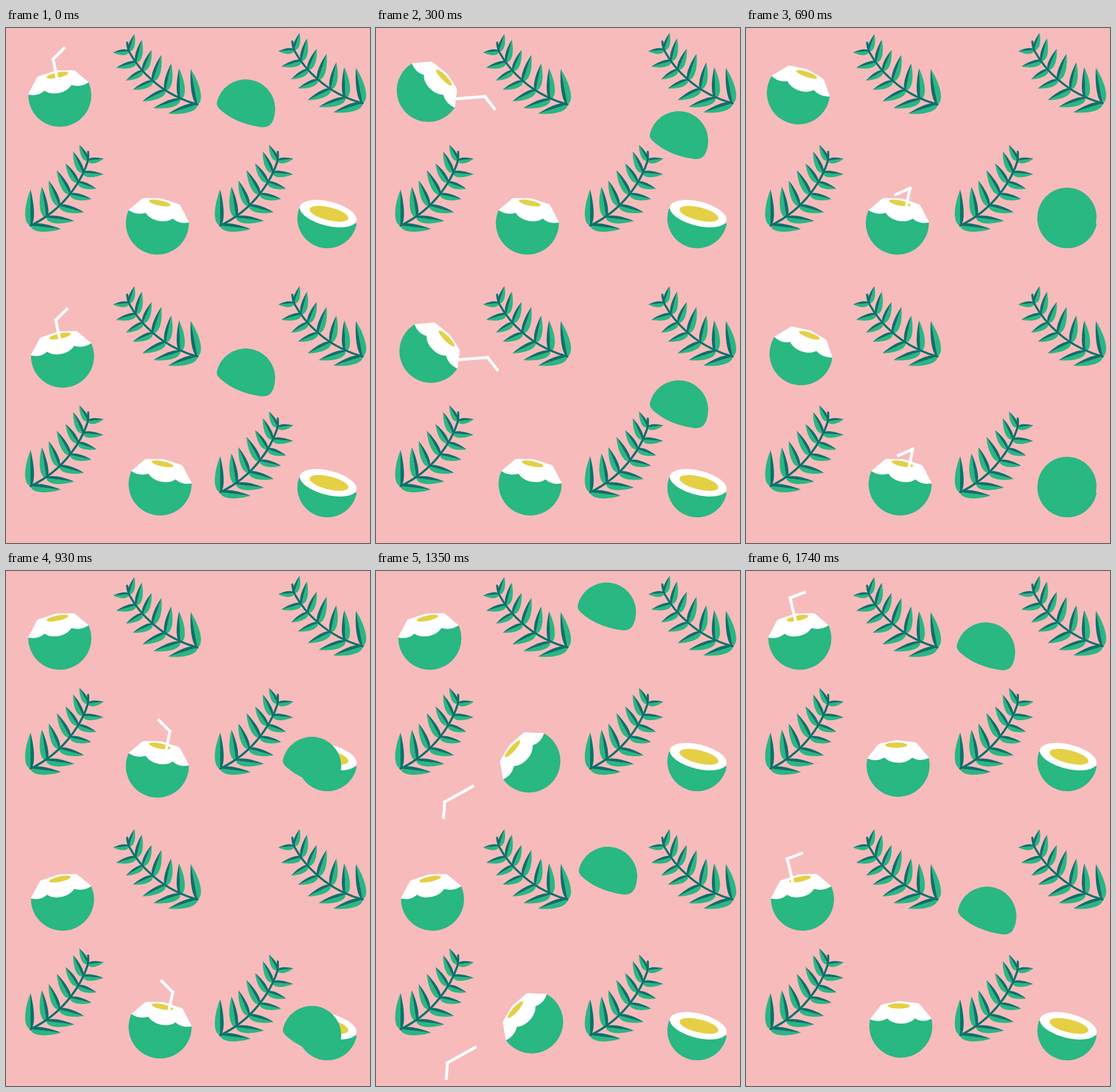
An HTML page for the animation above (1770 ms loop, 595x842 px).

```html
<!DOCTYPE html>
<html lang="en">
<head>
<meta charset="utf-8">
<title>Coconuts</title>
<style>
  html, body { margin: 0; width: 100%; height: 100%; overflow: hidden; background: #f7bbbc; }
  svg { display: block; width: 595px; height: 842px; }
  .green { fill: #29b782; }
  .dark { fill: #0d706b; }
  .white { fill: #fff; }
  .yellow { fill: #e5cf45; }
  .stem { fill: none; stroke: #0d706b; stroke-width: 3.4; stroke-linecap: round; }
  .tube { fill: none; stroke: #fff; stroke-width: 4.8; stroke-linecap: square; }

  /* The script steps these in 30 ms ticks. */
  .lid, .rock, .straw, .show, .grow, .bend {
    animation: 1770ms linear infinite paused;
  }
  .show { animation-timing-function: step-end; }
  .grow { transform-origin: -11px 54px; }

  .lid { animation-name: lid; }
  .early .rock { animation-name: rock-early; }
  .early .straw { animation-name: straw-early; }
  .early .show { animation-name: show-early; }
  .early .grow { animation-name: grow-early; }
  .early .bend { animation-name: bend-early; }
  .late .rock { animation-name: rock-late; }
  .late .straw { animation-name: straw-late; }
  .late .show { animation-name: show-late; }
  .late .grow { animation-name: grow-late; }
  .late .bend { animation-name: bend-late; }

  @keyframes lid {
    0% { translate: 0 0; }
    3.4% { translate: 9px 0; }
    8.5% { translate: 43px 9px; }
    16.95% { translate: 103px 52px; }
    23.7% { translate: 130px 113px; }
    30.5% { translate: 136px 163px; }
    33.9%, 44.1% { translate: 133px 177px; }
    47.5% { translate: 129px 178px; }
    52.55% { translate: 108px 187px; }
    55.9% { translate: 82px 202px; }
    61% { translate: 38px 233px; }
    64.4% { translate: 15px 261px; }
    67.8% { translate: -1px 290px; }
    71.2% { translate: -10px 319px; }
    76.3% { translate: -13px 367px; }
    81.4% { translate: -10px 402px; }
    86.4% { translate: -3px 424px; }
    91.5%, 100% { translate: 2px 432px; }
  }

  @keyframes rock-early {
    0%, 5.1% { rotate: 0deg; }
    8.5% { rotate: -10deg; }
    11.9% { rotate: -30deg; }
    14.7% { rotate: -47deg; }
    16.95% { rotate: -57.5deg; }
    20.3%, 28.2% { rotate: -60deg; }
    32.2% { rotate: -57deg; }
    35.6% { rotate: -46deg; }
    39% { rotate: -31deg; }
    44.1% { rotate: -12deg; }
    48.5% { rotate: -3deg; }
    52.5%, 100% { rotate: 0deg; }
  }
  @keyframes rock-late {
    0%, 58.2% { rotate: 0deg; }
    61.6% { rotate: -10deg; }
    65% { rotate: -28deg; }
    67.8% { rotate: -45deg; }
    71.2% { rotate: -56deg; }
    76.3%, 81.4% { rotate: -60deg; }
    86.4% { rotate: -53deg; }
    91.5% { rotate: -36deg; }
    94.9% { rotate: -23deg; }
    98.3%, 100% { rotate: -12deg; }
  }

  @keyframes straw-early {
    0%, 5.1% { translate: 0 0; rotate: 0deg; }
    8.5% { translate: -11px -2px; rotate: -11deg; }
    11.9% { translate: -38px 1px; rotate: -34deg; }
    14.7% { translate: -71px 22px; rotate: -68deg; }
    16.95% { translate: -101px 61px; rotate: -97deg; }
    22.6% { translate: -156px 116px; rotate: -131deg; }
    26% { translate: -185px 160px; rotate: -150deg; }
    26.1%, 100% { translate: var(--nudge) -7px; rotate: 2deg; }
  }
  @keyframes straw-late {
    0%, 58.2% { translate: 0 0; rotate: 0deg; }
    61.6% { translate: -11px -2px; rotate: -11deg; }
    65% { translate: -38px 1px; rotate: -34deg; }
    67.8% { translate: -71px 22px; rotate: -68deg; }
    76.3% { translate: -156px 116px; rotate: -131deg; }
    79.7%, 100% { translate: -190px 165px; rotate: -155deg; }
  }

  @keyframes show-early {
    0% { visibility: visible; }
    26% { visibility: hidden; }
    89.8%, 100% { visibility: visible; }
  }
  @keyframes show-late {
    0% { visibility: hidden; }
    32.2% { visibility: visible; }
    79.7%, 100% { visibility: hidden; }
  }

  @keyframes grow-early {
    0%, 89.7% { scale: 1; }
    89.8% { scale: 0; }
    94.9%, 100% { scale: 1; }
  }
  @keyframes grow-late {
    0%, 32.2% { scale: 0; }
    37.3%, 100% { scale: 1; }
  }

  @keyframes bend-early {
    0%, 89.7% { rotate: 0deg; }
    89.8% { rotate: -120deg; }
    94.9% { rotate: -78deg; }
    98.3%, 100% { rotate: -26deg; }
  }
  @keyframes bend-late {
    0%, 32.2% { rotate: -120deg; }
    39% { rotate: -69deg; }
    42.4% { rotate: -26deg; }
    47.5%, 100% { rotate: 0deg; }
  }
</style>
</head>
<body>
<svg viewBox="0 0 595 842" aria-hidden="true"></svg>
<script>
  const LOOP = 1770, TICK = 30;

  const group = (transform, content) => `<g transform="${transform}">${content}</g>`;
  const at = (x, y, content) => group(`translate(${x} ${y})`, content);
  const shape = (cls, d) => `<path class="${cls}" d="${d}"/>`;

  // One side of a leaflet, bulging away from its midrib, fullest near the stem.
  function blade(cls, [tx, ty], [bx, by], bulge) {
    const dx = bx - tx, dy = by - ty, len = Math.hypot(dx, dy);
    const point = p => [
      tx + dx * p + dy / len * bulge,
      ty + dy * p - dx / len * bulge
    ].map(v => v.toFixed(1)).join(' ');
    return shape(cls, `M${tx} ${ty}C${point(.5)} ${point(.95)} ${bx} ${by}Z`);
  }

  function leaflet(tip, base, side) {
    const len = Math.hypot(base[0] - tip[0], base[1] - tip[1]);
    return blade('green', tip, base, side * (4.5 + .12 * len)) +
           blade('dark', tip, base, -side * (3 + .08 * len));
  }

  // Stem node, upper tip, lower tip.
  const nodes = [
    [[201, 38], [210, 10], [175, 40]],
    [[213, 56], [222, 19], [180, 65]],
    [[224, 70], [238, 36], [196, 86]],
    [[240, 87], [254, 44], [207, 101]],
    [[261, 102], [270, 58], [223, 120]],
    [[285, 117], [283, 66], [241, 131]],
    [[313, 125], [302, 67], [265, 140]]
  ];
  const branch = nodes.map(([base, up, low]) =>
    leaflet(up, base, 1) + leaflet(low, base, -1)).join('') +
    shape('stem', 'M198 24Q199 34 202 40C216 66 252 109 313 125');
  const mirrored = group(
    'translate(40 323) rotate(-10.7) scale(-1 1) translate(-313 -125)', branch);

  const half =
    shape('green', 'M479 295A48.88 48.88 0 1 0 573.2 320Z') +
    group('translate(526.7 303.5) rotate(14)',
      '<ellipse class="white" rx="47.6" ry="19.8"/>' +
      '<ellipse class="yellow" cx="1.3" rx="32.6" ry="10.6"/>');

  const lid = '<g class="lid">' + shape('green',
    'M344.8 121A48.3 48.3 0 0 1 440 130C440 145 436 154 432 158' +
    'Q427 163 416 162Q376 156 352 135Q343 128 344.8 121Z') + '</g>';

  const nut = group('translate(6 6.3) rotate(12)',
    shape('green', 'M-50.3 -11A51.5 51.5 0 1 0 50.2 -11.5L20 -28H-20Z') +
    shape('white', 'M-50.5 -11L-33 -33.5Q-31.5 -35 -29 -35.8L-2.5 -41L28 -37.6' +
      'Q30 -37 31.5 -35L50.5 -12Q36 -5 23 -12.5C13 -1.2 -12 -1.2 -22 -12.5' +
      'Q-36 -5 -50.5 -11Z') +
    '<ellipse class="yellow" cx="-3" cy="-33" rx="18" ry="4.3"/>');

  const straw =
    '<g class="straw"><g class="show"><g class="grow">' +
    shape('tube', 'M0 0L-10.4 51') +
    '<g class="bend">' + shape('tube', 'M0 0L-18 -18') + '</g>' +
    '</g></g></g>';

  const coconut = (cls, strawX, strawY, nudge = 0) =>
    `<g class="${cls}" style="--nudge:${nudge}px"><g class="rock">${nut}</g>` +
    at(strawX, strawY, straw) + '</g>';
  const early = (x, y, nudge) =>
    group(`translate(${x} ${y}) scale(-1 1)`, coconut('early', 17, -52.7, nudge));
  const late = (x, y) => at(x, y, coconut('late', 26.6, -50.7));

  const copies = (content, spots) => spots.map(([x, y]) => at(x, y, content)).join('');

  document.querySelector('svg').innerHTML =
    copies(branch, [[0, 0], [270, -2], [0, 412], [270, 412]]) +
    copies(mirrored, [[0, 0], [310, 0], [0, 426], [310, 436]]) +
    copies(half, [[0, 0], [0, 440]]) +
    copies(lid, [[0, 0], [0, 440], [-2, -432]]) +
    early(94, 103.7, 5) + early(98.4, 530.3, 14) +
    late(241.4, 312.7) + late(245.9, 739.2);

  const animations = document.getAnimations();
  const start = performance.now();

  function tick() {
    const elapsed = (performance.now() - start) % LOOP;
    const time = Math.floor(elapsed / TICK) * TICK;
    for (const animation of animations) animation.currentTime = time;
    requestAnimationFrame(tick);
  }
  tick();
</script>
</body>
</html>
```
